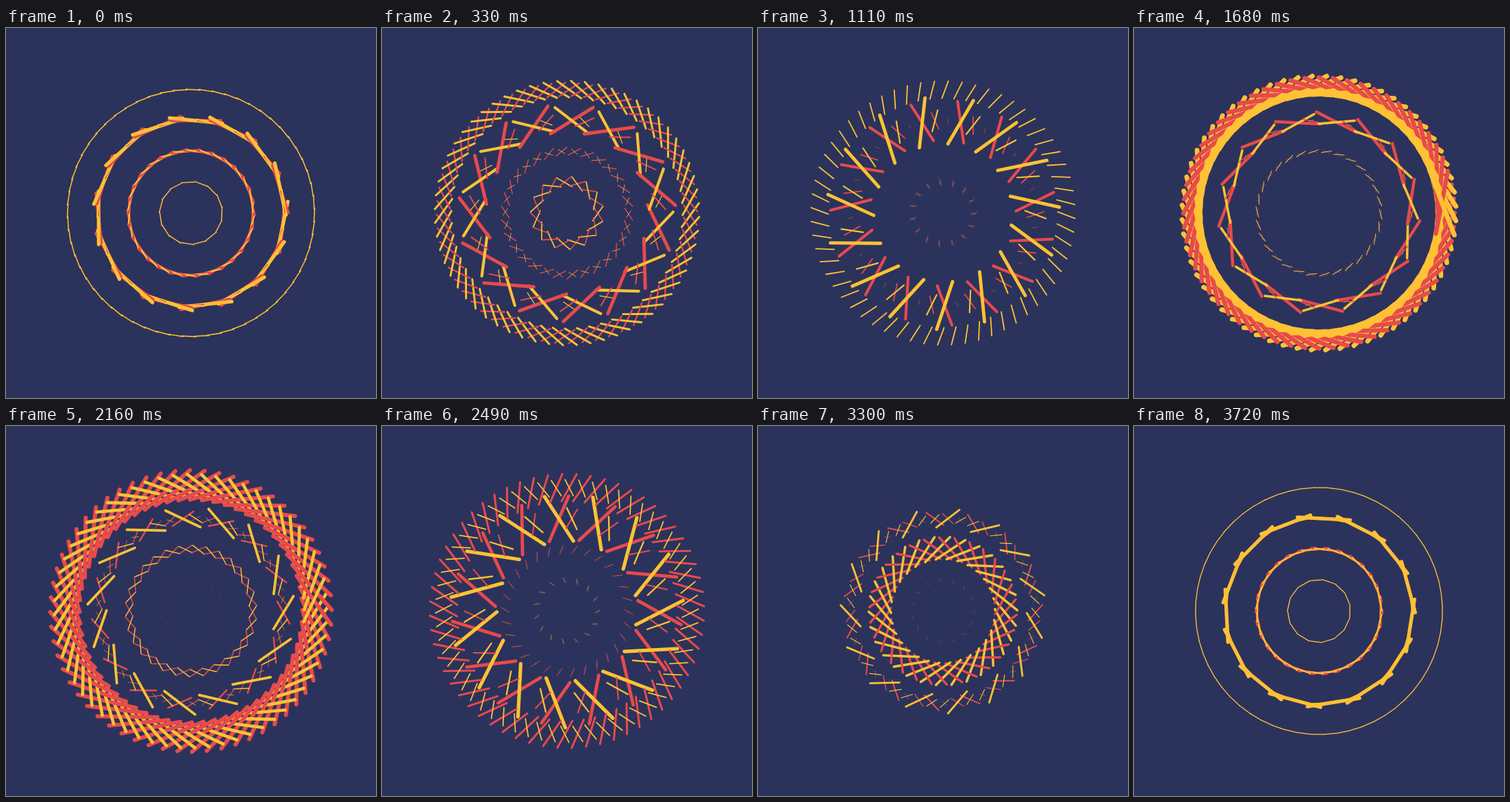
An HTML page with a canvas for the animation above (3750 ms loop, 540 px wide and 540 px high).

```html
<!DOCTYPE html>
<html lang="en">
<head>
<meta charset="utf-8">
<title>Turning rings</title>
<style>
  html, body { margin: 0; width: 100%; height: 100%; overflow: hidden; background: #2b335c; }
  canvas { display: block; width: 540px; height: 540px; }
</style>
</head>
<body>
<canvas id="stage" width="540" height="540"></canvas>
<script>
const ctx = document.getElementById('stage').getContext('2d');
const TAU = Math.PI * 2;
const RED = '#e84a4c', YELLOW = '#ffc234', BACK = '#2b335c';
const STEP = 30, STEPS = 125;
const RINGS = 4, SPACING = 45, PER_RING = 15;
const RING_LAG = 0.208, RED_LAG = 0.04, START = TAU / 360;

// Length of a dash for ring scale 1: a large and a small lobe with a long rest between.
function dashLength(phase) {
  const rest = Math.sin(Math.PI * (phase - 0.838));
  const flip = Math.sin(Math.PI * (phase - 0.265));
  return 56 * Math.abs(rest ** 3 * flip);
}

function dash(x, y, angle, length, color) {
  if (length < 0.02) return;
  const dx = Math.cos(angle) * length / 2;
  const dy = Math.sin(angle) * length / 2;
  ctx.strokeStyle = color;
  ctx.lineWidth = length / 15;
  ctx.beginPath();
  ctx.moveTo(x - dx, y - dy);
  ctx.lineTo(x + dx, y + dy);
  ctx.stroke();
}

function drawRing(ring, u) {
  const count = ring * PER_RING;
  const turn = TAU * (u + 0.25);
  for (let i = 0; i < count; i++) {
    const angle = START + TAU * i / count;
    const x = 270 + Math.cos(angle) * ring * SPACING;
    const y = 270 + Math.sin(angle) * ring * SPACING;
    // Only the third ring gets a fractional offset here.
    const phase = u - (RINGS - ring) * RING_LAG - i * 4 / ring;
    dash(x, y, angle - turn, ring * dashLength(phase - RED_LAG), RED);
    dash(x, y, angle + turn, ring * dashLength(phase), YELLOW);
  }
}

function draw() {
  const step = Math.floor(performance.now() / STEP + 0.001) % STEPS;
  const u = (step + 1) / STEPS;
  ctx.fillStyle = BACK;
  ctx.fillRect(0, 0, 540, 540);
  ctx.lineCap = 'round';
  for (let ring = 1; ring <= RINGS; ring++) drawRing(ring, u);
  requestAnimationFrame(draw);
}
draw();
</script>
</body>
</html>
```
